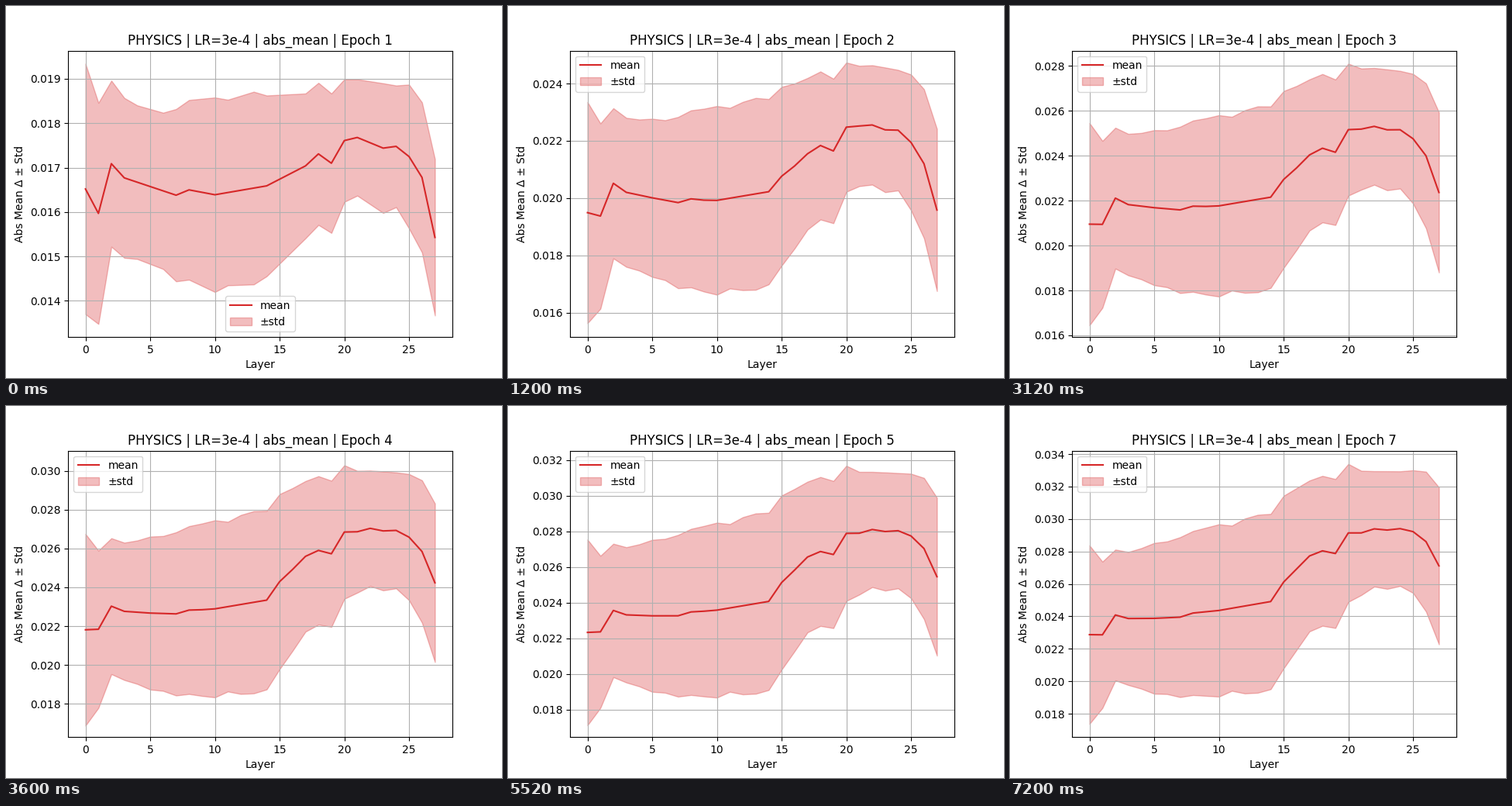
Write a matplotlib script that moves like this. It is 640 px wide and 480 px high and loops after 8000 ms.

```python
import numpy as np
import matplotlib.pyplot as plt
from matplotlib.animation import FuncAnimation

STEP_MS = 400
STEPS = 20           # 8 s loop
STEPS_PER_EPOCH = 3  # each epoch stays for 1.2 s
EPOCHS = 7
UNIT = 1e-5
LAYERS = np.arange(28)


def curve(points):
    """Straight lines through a few (layer: value) points."""
    return np.interp(LAYERS, list(points), list(points.values()))


def grow(start, gain, progress, lead):
    """Rise from start by gain; layers with a positive lead get there sooner."""
    hump = (4 * progress * (1 - progress)) ** 0.7
    return start + gain * (progress + lead * hump)


# Mean: first epoch, total rise, and how far each layer runs ahead
mean_start = curve({0: 1652, 1: 1597, 2: 1709, 3: 1677, 7: 1638, 8: 1650, 10: 1639,
                    14: 1659, 17: 1704, 18: 1731, 19: 1710, 20: 1761, 21: 1768,
                    23: 1744, 24: 1748, 25: 1725, 26: 1678, 27: 1543})
mean_gain = curve({0: 635, 1: 689, 5: 730, 10: 797, 14: 832, 15: 937, 17: 1068,
                   19: 1077, 20: 1153, 21: 1146, 22: 1183, 25: 1197, 27: 1168})
mean_lead = curve({0: 0.03, 1: 0.056, 2: 0.052, 9: 0.006, 14: -0.002, 16: -0.017,
                   22: -0.017, 24: -0.029, 27: -0.084})
mean_progress = [0, 0.439, 0.671, 0.813, 0.899, 0.958, 1]

# Standard deviation: the same three parts, with a geometric approach
std_start = curve({0: 282, 1: 249, 2: 187, 4: 173, 6: 176, 7: 194, 10: 219, 11: 209,
                   13: 217, 17: 163, 19: 157, 20: 138, 21: 131, 23: 146, 24: 137,
                   25: 162, 27: 176})
std_gain = curve({0: 268, 1: 202, 3: 230, 5: 290, 10: 312, 11: 300, 12: 326, 15: 342,
                  17: 302, 19: 302, 20: 287, 22: 217, 25: 216, 27: 308})
std_lead = curve({0: 0.038, 2: -0.005, 15: 0.005, 20: -0.05, 25: -0.005})
DECAY = 0.685
std_progress = (1 - DECAY ** np.arange(EPOCHS)) / (1 - DECAY ** (EPOCHS - 1))

# Value range that the vertical axis covers, per epoch
spans = [(1347.8, 1934.2), (1561, 2469.2), (1650.4, 2810.7), (1696.7, 3036.3),
         (1718.1, 3179), (1729.3, 3279.2), (1736, 3340.8)]

fig, ax = plt.subplots(figsize=(6.4, 4.8), dpi=100)


def draw(step):
    k = step // STEPS_PER_EPOCH
    mean = UNIT * grow(mean_start, mean_gain, mean_progress[k], mean_lead)
    std = UNIT * grow(std_start, std_gain, std_progress[k], std_lead)
    low, high = np.array(spans[k]) * UNIT
    margin = 0.05 * (high - low)

    ax.clear()
    ax.plot(LAYERS, mean, color="tab:red", label="mean")
    ax.fill_between(LAYERS, mean - std, mean + std,
                    color="tab:red", alpha=0.3, label="±std")
    ax.set_ylim(low - margin, high + margin)
    ax.set_title(f"PHYSICS | LR=3e-4 | abs_mean | Epoch {k + 1}")
    ax.set_xlabel("Layer")
    ax.set_ylabel("Abs Mean Δ ± Std")
    ax.grid(True)
    ax.legend(loc="lower center" if k == 0 else "upper left")
    return []


anim = FuncAnimation(fig, draw, frames=STEPS, interval=STEP_MS,
                     init_func=lambda: draw(0), repeat=True, repeat_delay=0)
plt.show()
```
